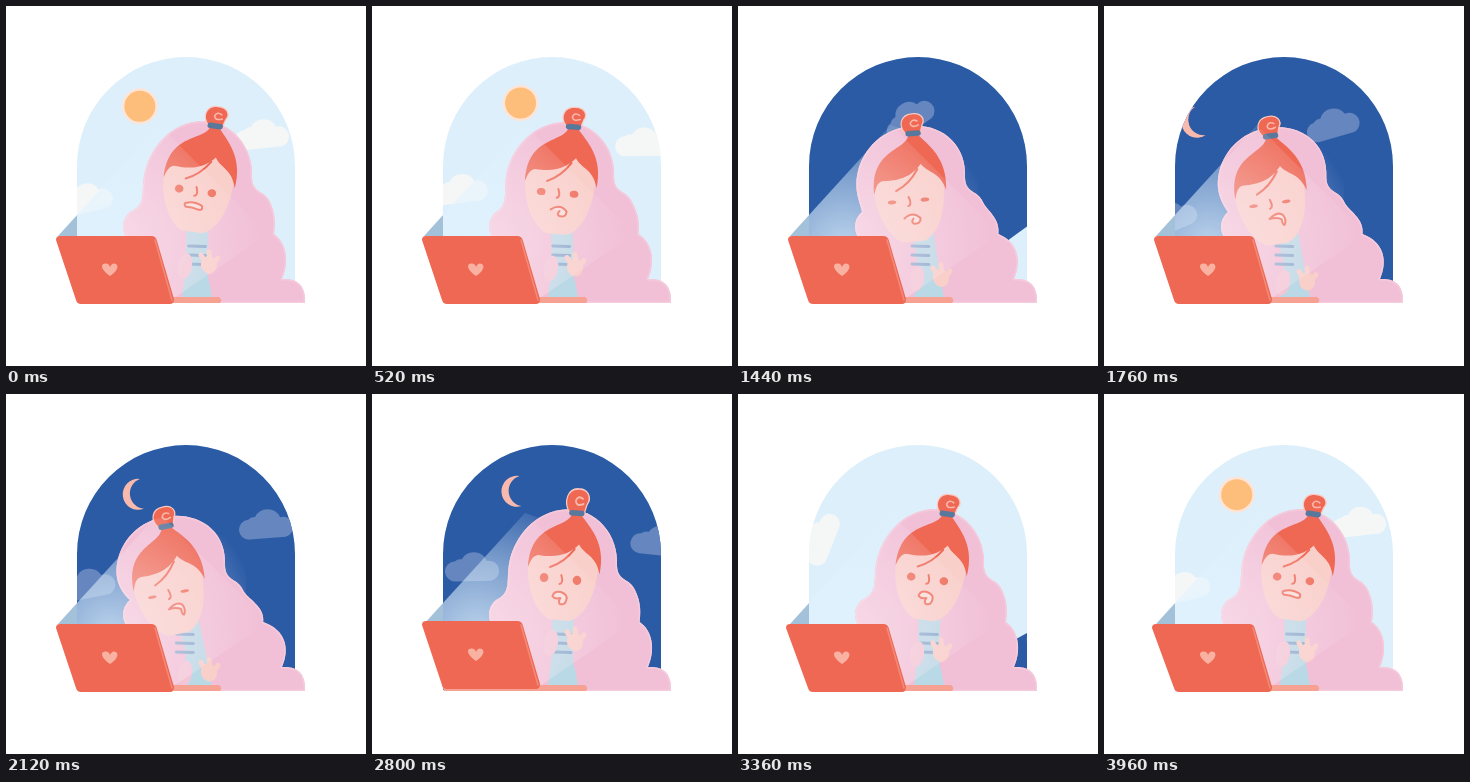
An HTML page with a canvas that plays this animation: 360x360 px, repeating every 4000 ms.

```html
<!DOCTYPE html>
<html lang="en">
<head>
<meta charset="utf-8">
<title>Long day at the laptop</title>
<style>
  html, body { margin: 0; width: 100%; height: 100%; overflow: hidden; background: #fff; }
  canvas { display: block; width: 360px; height: 360px; }
</style>
</head>
<body>
<canvas width="360" height="360"></canvas>
<script>
const ctx = document.querySelector('canvas').getContext('2d');
const LOOP = 4000;
const RED = '#ee6854', SKIN = '#f9cfc9', PINK = '#f1c0d7', BLUE = '#b9d9e6';
const PIVOT = { x: 182, y: 280 };
const rad = deg => deg * Math.PI / 180;

// time, clouds, sun and moon, edge of night, head x, head y, head tilt, eye height, startle
const POSES = [
  [0,    0,     0,   -90, 190, 185, 8,   4,   0],
  [960,  18,    15,  -90, 180, 190, 0,   2.8, 0],
  [1440, 150,   140, 54,  171, 195, -5,  2,   0],
  [2120, 181.5, 178, 90,  163, 200, -11, 1.5, 0],
  [2560, 187,   180, 90,  162, 201, -12, 1.4, 0],
  [2800, 192,   182, 90,  189, 185, 5,   4.6, 1],
  [3360, 297.5, 300, 241, 190, 185, 8,   4,   0],
  [4000, 360,   360, 270, 190, 185, 8,   4,   0]
];

// Monotone cubic interpolation: smooth between poses, never overshooting.
function poseAt(t) {
  let i = 0;
  while (i < POSES.length - 2 && t >= POSES[i + 1][0]) i++;
  const a = POSES[i], b = POSES[i + 1], span = b[0] - a[0], u = (t - a[0]) / span;
  const secant = (k, col) => (POSES[k + 1][col] - POSES[k][col]) / (POSES[k + 1][0] - POSES[k][0]);
  const slope = (k, col) => {
    if (k === 0 || k === POSES.length - 1) return 0;
    const p = secant(k - 1, col), q = secant(k, col);
    return p * q > 0 ? 2 * p * q / (p + q) : 0;
  };
  const at = col => {
    const v = u * u * (3 - 2 * u);
    return a[col] + (b[col] - a[col]) * v +
      span * (slope(i, col) * u * (1 - u) ** 2 - slope(i + 1, col) * u * u * (1 - u));
  };
  const [clouds, orbs, edge, x, y, tilt, eye, startle] = [1, 2, 3, 4, 5, 6, 7, 8].map(at);
  return { clouds, orbs, edge, x, y, tilt, eye, startle };
}

function fill(path, color) {
  ctx.fillStyle = color;
  ctx.fill(new Path2D(path));
}

function stroke(path, color, width) {
  ctx.strokeStyle = color;
  ctx.lineWidth = width;
  ctx.stroke(new Path2D(path));
}

function ellipse(x, y, rx, ry, color, turn = 0) {
  ctx.fillStyle = color;
  ctx.beginPath();
  ctx.ellipse(x, y, rx, ry, rad(turn), 0, 7);
  ctx.fill();
}

function within(setup, draw) {
  ctx.save();
  setup();
  draw();
  ctx.restore();
}

function orbit(angle, radius, tilt, draw) {
  within(() => {
    ctx.translate(PIVOT.x, PIVOT.y);
    ctx.rotate(rad(angle));
    ctx.translate(0, -radius);
    ctx.rotate(rad(tilt - angle));
  }, draw);
}

function cloud(color) {
  fill('M-18 15A10 10 0 0 1-18-5A8 8 0 0 1-11-7A14 14 0 0 1 14-5A10 10 0 0 1 18 15Z', color);
}

function sky(pose) {
  ctx.fillStyle = '#dceffa';
  ctx.fillRect(70, 50, 220, 248);
  ctx.fillStyle = '#2c5ba6';
  ctx.beginPath();
  ctx.arc(182, 298, 400, rad(pose.edge - 270), rad(pose.edge - 90));
  ctx.fill();

  orbit(pose.orbs - 15, 186, 0, () => {
    ellipse(0, 0, 18, 18, '#fde4d6');
    ellipse(0, 0, 15.5, 15.5, '#fdbd7b');
  });
  orbit(pose.orbs - 195, 187, pose.orbs - 180, () =>
    fill('M7-16A15.5 15.5 0 1 0 10 14A15.5 15.5 0 0 1 7-16Z', '#f9b9ad'));

  for (const [turn, color] of [[0, '#f5f7f7'], [180, '#6586be']]) {
    const angle = pose.clouds - turn;
    orbit(angle + 26, 170, angle - 6, () => cloud(color));
    orbit(angle - 49, 135, angle - 13, () => cloud(color));
  }
}

function glow(path, rgb, strength) {
  const light = ctx.createRadialGradient(105, 240, 10, 105, 240, 150);
  light.addColorStop(0, `rgba(${rgb},${strength})`);
  light.addColorStop(.45, `rgba(${rgb},${strength * .6})`);
  light.addColorStop(1, `rgba(${rgb},0)`);
  fill(path, light);
}

function blanketPath(x) {
  const droop = 190 - x, top = 115 + droop * .25, bump = 268 - droop * .4;
  return `M150 297L140 244C118 240 110 218 124 206
    C${x - 48} 198 ${x - 56} 185 ${x - 51} 165
    C${x - 46} 145 ${x - 28} ${top + 1} ${x + 7} ${top}
    C${x + 35} ${top} ${x + 58} 140 ${x + 56} 172
    C${x + 57} 188 ${x + 69} 184 ${x + 74} 196
    C${x + 78} 205 ${bump + 2} 212 ${bump} 228
    C280 236 284 255 276 273C292 272 300 280 299 297Z`;
}

function shirt(x) {
  const left = 178 + (x - 180) * .45;
  fill(`M${left - 2} 215H${left + 20}L201 265 205 292H176L180 260Z`, BLUE);
  for (const y of [240, 249, 258]) stroke(`M${left} ${y}l17 .5`, '#86a9cd', 2.8);
}

function hands(pose) {
  fill('M178 277L203 275 206 292H177Z', BLUE);
  within(() => ctx.translate(0, (pose.y - 185) * 1.3 - pose.startle * 11), () => {
    ellipse(179, 260, 7, 13, '#f3c6d6', 10);
    ellipse(203, 259, 8, 9, SKIN, -15);
    stroke('M199 256l-4-7M204 254l-1-8M208 257l4-5', SKIN, 5);
  });
}

function mouth(t) {
  let shape;
  if (t < 480 || t >= 3680) shape = 'M-8 13Q0 10 8 14Q10 19 4 18Q-3 16-8 17Q-11 14-8 13Z';
  else if (t < 1760) shape = 'M-6 17Q3 10 10 18Q10 24 3 23Q0 21 3 18';
  else if (t < 2640) shape = 'M-3 15Q6 8 11 13Q14 18 11 23Q9 23 9 17Q4 14-3 15Z';
  else shape = 'M-7 18Q-6 12 1 13Q9 15 7 21Q6 26 1 25Q-1 23 1 19Q-4 21-7 18Z';
  fill(shape, '#f8ded8');
  stroke(shape, RED, 2);
}

function head(pose, t) {
  within(() => {
    ctx.translate(pose.x, pose.y);
    ctx.rotate(rad(pose.tilt));
  }, () => {
    fill('M-34-20C-36 10-22 37-8 41H12C28 35 37 10 36-20L10-50Z', SKIN);
    fill(`M5-65C0-50-35-54-34-9C-32-16-30-21-25-22C-2-20 8-28 15-36
      C21-26 33-27 38-8C42-40 24-54 15-65Z`, RED);
    stroke('M11-31Q2-17-12-11', RED, 2);

    within(() => {
      ctx.translate(10, -68);
      ctx.scale(1, 1 + pose.startle * .25);
    }, () => {
      const bun = 'M-7 0C-14-8-10-18 0-18C9-19 13-12 9-7Q8-4 7 0Z';
      stroke(bun, '#f9cbc3', 2.5);
      fill(bun, RED);
      stroke('M6-7Q-1-4-2-9Q0-14 5-11', '#f9b8aa', 1.6);
    });
    stroke('M5-67H15', '#58789c', 5.5);

    ellipse(-17, 0, 4.3, pose.eye, RED);
    ellipse(16, 0, 4.3, pose.eye, RED);
    stroke('M0-4Q3 4-1 5', RED, 2);
    mouth(t);
  });
}

function laptop(pose, t) {
  const corner = t >= 2840 ? 48 : 50;
  fill('M70 291H213Q217 294 214 297H72Z', '#f6a192');
  within(() => ctx.translate(0, pose.startle * -3), () => {
    fill(`M${corner + 4} 230H145Q150 230 151 235L168 293Q168 298 164 298H75
      Q71 298 70 294L${corner} 234Q${corner} 230 ${corner + 4} 230Z`, RED);
    stroke('M149 234L166 294', '#f28a78', 1.5);
    fill('M104 270C95 264 94 258 99 257.5Q103 257 104 261Q106 256 110 258C114 261 109 267 104 270Z', '#f9b2a2');
  });
}

function draw(t) {
  const pose = poseAt(t);
  ctx.fillStyle = '#fff';
  ctx.fillRect(0, 0, 360, 360);
  ctx.lineCap = ctx.lineJoin = 'round';

  fill('M52 230L72 208V230Z', '#a3c1d8');
  within(() => ctx.clip(new Path2D('M71 296V160A109 109 0 0 1 289 160V296Z')), () => {
    sky(pose);
    glow('M52 230L153 119 240 150V297H100Z', '224,242,254', .75);
  });

  const blanket = blanketPath(pose.x);
  fill(blanket, PINK);
  within(() => ctx.clip(new Path2D(blanket)), () => {
    stroke(blanket, '#f5cbdc', 3);
    shirt(pose.x);
  });
  head(pose, t);
  hands(pose);
  within(() => ctx.clip(new Path2D(blanket)), () =>
    glow('M52 230L153 119 262 228 168 292Z', '252,236,243', .55));
  laptop(pose, t);
}

function frame() {
  draw(performance.now() % LOOP);
  requestAnimationFrame(frame);
}
frame();
</script>
</body>
</html>
```
